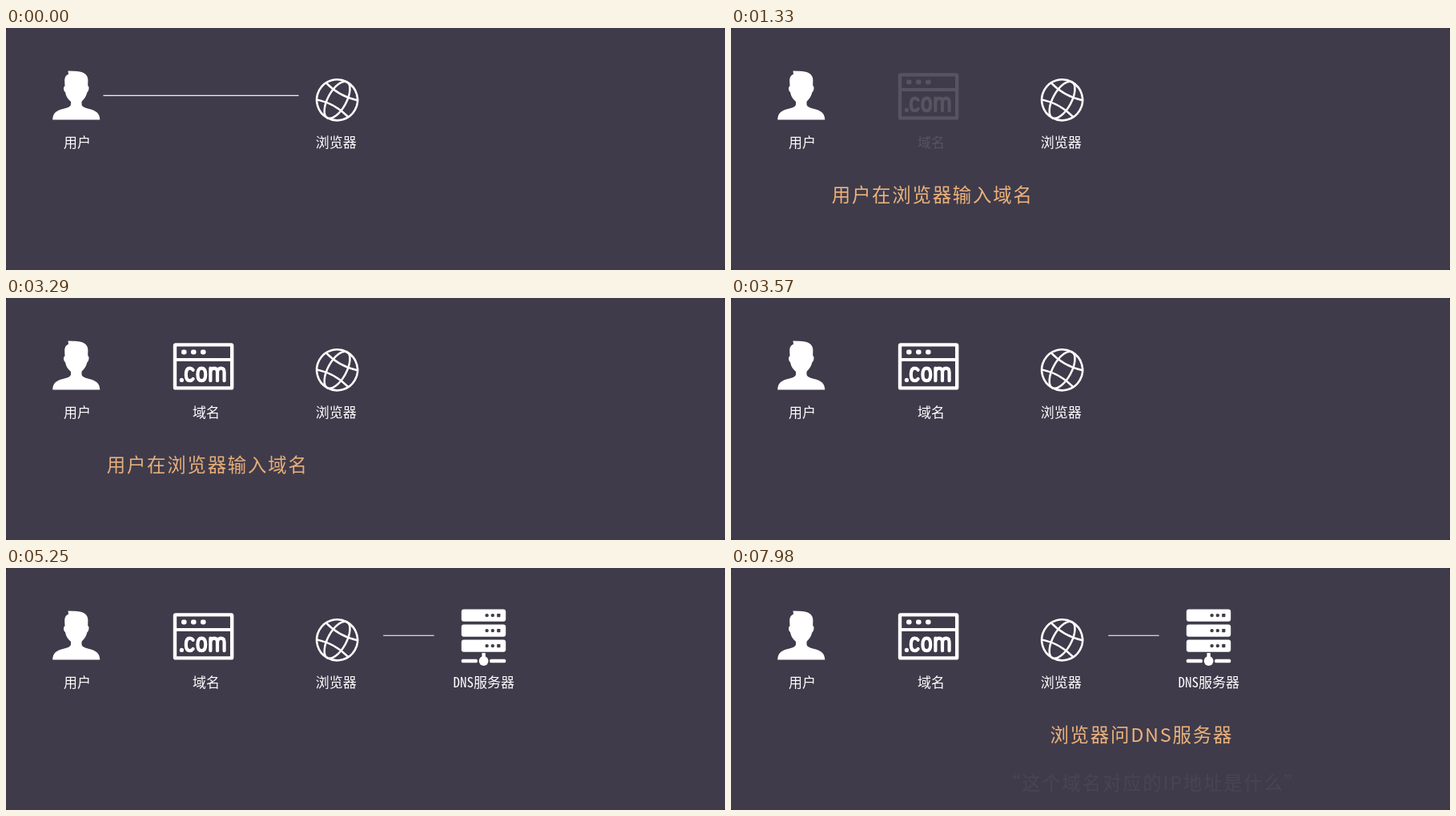
Write an HTML page that moves like this. It is 898x302 px and loops after 8000 ms.

```html
<!DOCTYPE html>
<html lang="zh-CN">
<head>
<meta charset="utf-8">
<title>域名解析</title>
<style>
  :root { --bg: #3f3b4a; --ink: #fff; }
  html, body { margin: 0; width: 100%; height: 100%; overflow: hidden; background: #25232c; }
  svg { display: block; width: 898px; height: 302px; }
  text { font-family: "Noto Sans CJK SC", "Noto Sans CJK", "Noto Sans", sans-serif; white-space: pre; }
  .label { font-size: 17px; font-weight: 500; fill: var(--ink); }
  .mono { font-family: "Noto Sans Mono CJK SC", "Noto Sans CJK SC", "Noto Sans CJK", monospace; }
  .note { font-size: 23.4px; letter-spacing: 1.8px; fill: #edb27c; }
  .icon { fill: var(--ink); }
  .wire { fill: none; stroke: var(--ink); stroke-linecap: round; stroke-linejoin: round; }
  .hole { fill: var(--bg); }

  /* Fades advance every 70 ms; the small lead keeps steps on their marks. */
  .fade { animation: 8s linear -2ms infinite both; }
  .link { animation-name: link; }
  .typed { animation-name: typed; }
  .domain { animation-name: domain; }
  .dns { animation-name: dns; }
  .ask { animation-name: ask; }
  .quote { animation-name: quote; }

  @keyframes typed {
    0% { opacity: 0; }
    2.625% { opacity: 0; animation-timing-function: steps(5); }
    7%, 41.124% { opacity: 1; }
    41.125% { opacity: .97; animation-timing-function: steps(4); }
    44.625%, 100% { opacity: 0; }
  }
  @keyframes link {
    0% { opacity: 1; }
    14% { opacity: 1; animation-timing-function: steps(3); }
    16.625%, 100% { opacity: 0; }
  }
  @keyframes domain {
    0% { opacity: 0; }
    15.75% { opacity: 0; animation-timing-function: steps(8); }
    22.75%, 100% { opacity: 1; }
  }
  @keyframes dns {
    0% { opacity: 0; }
    59.5% { opacity: 0; animation-timing-function: steps(7); }
    65.625%, 100% { opacity: 1; }
  }
  @keyframes ask {
    0% { opacity: 0; }
    77% { opacity: 0; animation-timing-function: steps(6); }
    82.25%, 100% { opacity: 1; }
  }
  @keyframes quote {
    0%, 99.749% { opacity: 0; }
    99.75%, 100% { opacity: .05; }
  }
</style>
</head>
<body>
<svg viewBox="0 0 898 302">
  <defs>
    <g id="unit">
      <rect class="icon" x="568.8" width="55.4" height="15.4" rx="3"/>
      <circle class="hole" cx="600.6" cy="7.7" r="2.2"/>
      <circle class="hole" cx="607.8" cy="7.7" r="2.2"/>
      <rect class="hole" x="613.2" y="5.6" width="4.2" height="4.2" rx=".6"/>
    </g>
    <rect id="button" class="icon" y="64.6" width="6.6" height="5.8" rx="2.4"/>
  </defs>
  <rect width="898" height="302" rx="3" fill="var(--bg)"/>

  <!-- user -->
  <path class="icon" d="M77.5 53.5L84 53.8C95 53.5 102.4 57 102.4 65L102.2 72C104.5 73 103.5 79 101.5 80
    C100 86 97 89 94.5 92V95.5C95 98.5 99 99.5 104 101C112 103 117 106 117.3 114.5H58.2
    C58.5 106 63 103 71 101C76 99.7 80.5 98.5 81 95.5V92C78 89 75 86 74 80
    C72 79 71 73.5 73.5 72.5L73.2 66C73.2 62 74.5 59 78 57.5Z"/>
  <text class="label" x="71.9" y="149.2">用户</text>

  <rect class="fade link icon" x="121.5" y="83.7" width="244" height="1.2"/>

  <!-- browser -->
  <g class="wire" transform="translate(413.6 89.8) rotate(29)" stroke-width="2.5">
    <circle r="25.5" stroke-width="2.6"/>
    <ellipse rx="11.5" ry="25.5"/>
    <path d="M-22.5 -12Q0 -5 22.5 -12M-22.5 12Q0 5 22.5 12"/>
  </g>
  <text class="label" x="386.7" y="149.2">浏览器</text>

  <!-- domain -->
  <g class="fade domain">
    <rect class="wire" x="211" y="58.4" width="71.2" height="54" rx="1" stroke-width="4.4"/>
    <path class="wire" d="M211 77H282" stroke-width="4"/>
    <use href="#button" x="219"/>
    <use href="#button" x="231"/>
    <use href="#button" x="243"/>
    <circle class="icon" cx="219.4" cy="102.4" r="2.6"/>
    <path class="wire" stroke-width="4.2" d="M233.6 89.8Q232 87.6 229.6 87.6C226.2 87.6 224.8 91 224.8 95.4C224.8 100 226.2 103.2 229.6 103.2Q232 103.2 233.6 101
      M239.4 95.4C239.4 90.5 241 87.6 244.3 87.6C247.6 87.6 249.2 90.5 249.2 95.4C249.2 100.4 247.6 103.2 244.3 103.2C241 103.2 239.4 100.4 239.4 95.4Z
      M255.4 103.2V87.6M255.4 92Q256 87.6 259.8 87.6Q264 87.6 264 92.5V103.2M264 92.5Q264.5 87.6 268.5 87.6Q272.6 87.6 272.6 92.5V103.2"/>
    <text class="label" x="233" y="149.2">域名</text>
  </g>

  <!-- name server -->
  <g class="fade dns">
    <rect class="icon" x="471.2" y="83.7" width="63.4" height="1.2" opacity=".85"/>
    <use href="#unit" y="51.4"/>
    <use href="#unit" y="70.4"/>
    <use href="#unit" y="89.4"/>
    <g class="icon">
      <rect x="568.8" y="113.7" width="20" height="4.6" rx="1.5"/>
      <rect x="604.2" y="113.7" width="20" height="4.6" rx="1.5"/>
      <rect x="594.4" y="106" width="4.4" height="5" rx=".6"/>
      <circle cx="596.6" cy="116" r="5.9"/>
    </g>
    <text class="label mono" x="558.5" y="149.2">DNS服务器</text>
  </g>

  <text class="fade typed note" x="125.7" y="217.2">用户在浏览器输入域名</text>
  <text class="fade ask note" x="398.4" y="217.2">浏览器问DNS服务器</text>
  <text class="fade quote note" x="338" y="277.2" style="fill: #fff">“这个域名对应的IP地址是什么”</text>
</svg>
</body>
</html>
```
